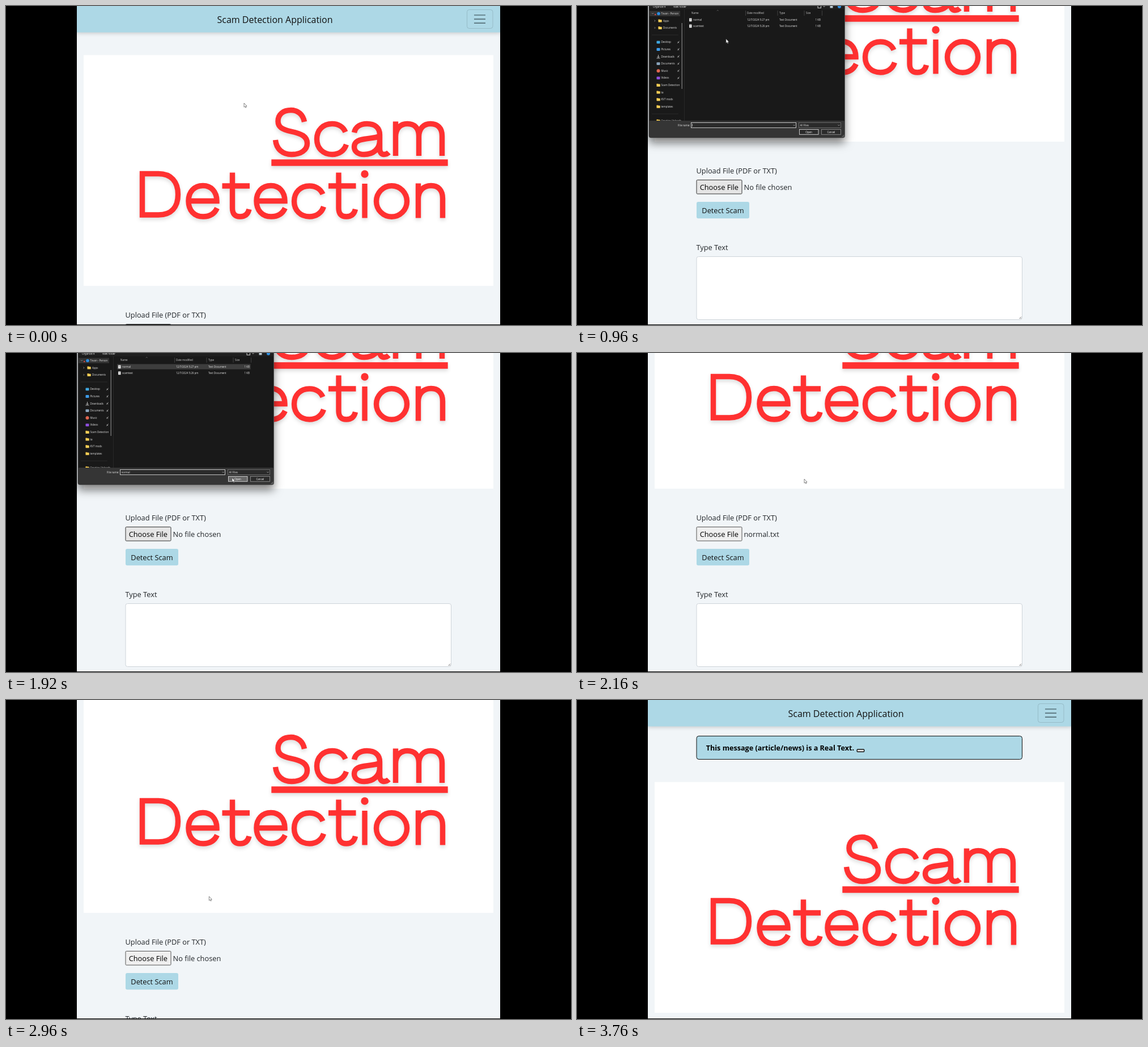
Recreate the animation shown at these times as an HTML page. Size 997 px wide and 562 px high, loop 3840 ms.

```html
<!DOCTYPE html>
<html lang="en">
<head>
<meta charset="utf-8">
<title>Scam Detection Application</title>
<style>
html, body { margin: 0; width: 100%; height: 100%; overflow: hidden; background: #000; }
svg { display: block; }
text { font-family: "Open Sans", "Noto Sans", sans-serif; white-space: pre; }
.lettering { fill: none; stroke: #ff3131; stroke-width: 9.4; filter: drop-shadow(0 4px 3px rgba(0, 0, 0, .13)); }
.nav { filter: drop-shadow(0 2px 3px rgba(0, 0, 0, .16)); }
.frame { filter: drop-shadow(0 9px 8px rgba(0, 0, 0, .5)); }
</style>
</head>
<body>
<svg id="stage" width="997" height="562" viewBox="0 0 997 562"></svg>
<script>
const LOOP = 3840, STEP = 80;
const INK = '#212529', SKY = '#add8e6';

const rect = (x, y, w, h, fill, more = '') =>
  `<rect x="${x}" y="${y}" width="${w}" height="${h}" fill="${fill}" ${more}/>`;
const text = (x, y, s, size = 12.8, fill = INK, more = '') =>
  `<text x="${x}" y="${y}" font-size="${size}" fill="${fill}" ${more}>${s}</text>`;
const line = (d, color, w = 1, more = '') =>
  `<path d="${d}" fill="none" stroke="${color}" stroke-width="${w}" ${more}/>`;
const dot = (x, y, r, fill) => `<circle cx="${x}" cy="${y}" r="${r}" fill="${fill}"/>`;
const group = (id, body, more = '') => `<g id="${id}" ${more}>${body}</g>`;

// Banner lettering, drawn as strokes along the middle of each letter
const glyphs = {
  S: 'M526.5 204C524 191 515 183.5 503 183.5C489 183.5 480 191 480 203C480 213 487 217.5 503 221C522 225 531.5 230 531.5 242C531.5 254 520 261.5 504 261.5C488 261.5 477 252 475.5 236',
  c: 'M599 222C595 212.5 586 207.5 575.5 207.5C559.5 207.5 548.5 218.5 548.5 234.5C548.5 250.5 559.5 261.5 575.5 261.5C587.5 261.5 597 255 600.5 244',
  a: 'M614.5 223C616.5 213 625 207.5 637 207.5C651 207.5 659.5 214.5 659.5 227V251C659.5 259 663 261.5 667 261.5C670.5 261.5 673 260.5 675.5 258M659.5 229C655 232 645 232.5 632 234.5C619 236.5 614.5 241 614.5 248C614.5 257 622 261.5 632 261.5C648 261.5 659.5 252 659.5 237',
  m: 'M687.5 203.5V264M687.5 230C687.5 216 696 207.5 708 207.5C721 207.5 728.5 215 728.5 229V264M728.5 230C728.5 216 737 207.5 749 207.5C762 207.5 769.5 215 769.5 229V264',
  D: 'M240.5 295.5H269C291 295.5 303.5 309 303.5 332C303.5 355 291 368 269 368H240.5Z',
  e: 'M322 343.5H372C372 327 362 316.5 347.5 316.5C332 316.5 322 327.5 322 343.5C322 360 332 371 348 371C359 371 368 366 372.5 356',
  t: 'M399.5 293.5V356C399.5 366 404 371 413 371C421 371 427 367 429 358M381.5 317H430',
  i: 'M633 313V373.5',
  o: 'M653.5 344a27 27.3 0 1 0 54 0a27 27.3 0 1 0 -54 0',
  n: 'M727.5 312.5V373.5M727.5 340C727.5 325 737 316.5 750 316.5C763 316.5 770.5 324.5 770.5 339V373.5'
};
const put = (ch, dx = 0, dy = 0) => `<path d="${glyphs[ch]}" transform="translate(${dx} ${dy})"/>`;
const lettering = `<g class="lettering" role="img" aria-label="Scam Detection">
  ${[...'Scam', ...'Detion'].map(ch => put(ch)).join('')}
  ${put('e', 120)}${put('c', -40, 109.5)}${put('t', 187.5)}
  <path d="M468.3 276H779.7" stroke-width="11.4"/>
  <circle cx="633" cy="296" r="6.7" fill="#ff3131" stroke="none"/></g>`;

const nav = `<g class="nav">${rect(125, -4, 747, 50.5, SKY)}</g>`
  + text(372.5, 29.7, 'Scam Detection Application', 16, '#111')
  + rect(813.5, 6.5, 45.5, 33, 'none', 'rx="4" stroke="#000" stroke-opacity=".13"')
  + line('M826 16H846M826 23.2H846M826 30.2H846', '#56707a', 1.7);

const alertBox = rect(211, 63.5, 574.5, 41, SKY, 'rx="4" stroke="#111"')
  + text(227.7, 89, 'This message (article/news) is a Real Text.', 12.6, '#000', 'font-weight="700"')
  + rect(494.2, 87, 12.5, 4.2, '#efefef', 'rx="1" stroke="#111" stroke-width="1.4"');

const main = rect(137, 86.5, 723, 406.5, '#fff') + lettering
  + text(210.5, 548.8, 'Upload File (PDF or TXT)')
  + rect(211, 560.5, 80, 24.5, '#efefef', 'id="choose" rx="1.5" stroke="#555"')
  + text(216.7, 578, 'Choose File', 12.8, '#000')
  + group('fileName', text(294.5, 578, 'No file chosen'))
  + rect(209.2, 597.2, 96.6, 32.6, '#8cc4f5', 'id="ring" rx="5"')
  + rect(211, 599, 93, 29.3, SKY, 'id="detect" rx="3"')
  + text(220.3, 618.5, 'Detect Scam', 12.8, '#111', 'id="detectText"')
  + text(210.5, 683.6, 'Type Text')
  + rect(211, 695.5, 574.5, 111, '#fff', 'rx="3.5" stroke="#ced4da"')
  + line('M780.5 805L784 801.5M782.8 805L784 803.8', '#555', .8);

// File picker
const tiny = (x, y, s, fill = '#e4e4e4', more = '') => text(x, y + 1.6, s, 4.5, fill, more);
const folder = (x, y) => rect(x, y - 2.5, 3, 2, '#d9a32b') + rect(x, y - 1.8, 6.2, 4.4, '#f6cf57', 'rx=".6"');
const chip = color => (x, y) => rect(x, y - 2.3, 6, 4.8, color, 'rx="1"');
const disc = color => (x, y) => dot(x + 3, y, 3, color);
const arrowDown = (x, y) => line(`M${x + 3} ${y - 3}V${y + 1.5}M${x + 1} ${y}L${x + 3} ${y + 2}L${x + 5} ${y}M${x} ${y + 3}H${x + 6}`, '#ddd', .8);
const places = [
  ['Desktop', chip('#3fa7e0')], ['Pictures', chip('#3d9be9')], ['Downloads', arrowDown],
  ['Documents', chip('#8ba5bd')], ['Music', disc('#e0654f')], ['Videos', chip('#8f4fe0')],
  ['Scam Detection', folder], ['ta', folder], ['KV7 mods', folder], ['templates', folder]
];
const pin = (x, y) => line(`M${x - 1.6} ${y + 1.8}L${x} ${y}M${x - 1.3} ${y - .9}L${x + .9} ${y + 1.3}M${x - .4} ${y}L${x + 1.6} ${y - 1.8}`, '#bbb', .9);
const sidebar = rect(128, 8.5, 54, 9.5, '#333')
  + line('M132 12.3L133.6 14L135.2 12.3M136.5 24.5L138 26L136.5 27.5M136.5 37L138 38.5L136.5 40', '#aaa', .7)
  + dot(144, 13.5, 2.8, '#2b8de0') + dot(138.2, 15, 1.2, '#e04848')
  + tiny(148.5, 13.3, 'Tovan - Person')
  + folder(143.5, 26) + tiny(152, 26, 'Apps') + folder(143.5, 38.5) + tiny(152, 38.5, 'Documents')
  + line('M132 51H179M132 190H179', '#333', .7)
  + places.map(([name, icon], i) => {
      const y = 63.8 + i * 12.6;
      return icon(140.5, y) + tiny(148.5, y, name) + (i < 6 ? pin(179, y) : '');
    }).join('')
  + folder(140.5, 202.3) + tiny(148.5, 202.3, 'Creative Uploads')
  + line('M185.2 30V146', '#9a9a9a', 1);

const cols = [['Name', 202], ['Date modified', 300], ['Type', 357], ['Size', 404]];
const fileRow = (y, name, date) =>
  rect(198, y - 2.8, 4.6, 5.8, '#e8e8e8', 'rx=".4"') + line(`M199 ${y - 1}H201.6M199 ${y + .5}H201.6`, '#777', .5)
  + tiny(205, y, name) + tiny(300, y, date) + tiny(357, y, 'Text Document')
  + tiny(430, y, '1 KB', '#e4e4e4', 'text-anchor="end"');

const picker = `<g class="frame">${rect(127, -20, 345.5, 252, '#191919', 'rx="3" stroke="#555" stroke-width=".8"')}</g>`
  + rect(127.4, -10, 344.7, 16, '#1f1f1f')
  + tiny(134, 1, 'Organize ▾') + tiny(170, 1, 'New folder')
  + rect(425, -3, 5.5, 6.5, 'none', 'stroke="#ccc"') + line('M434.5 0L436 1.6L437.5 0', '#ccc', .8)
  + rect(446.5, -3, 5, 6.5, '#b9c8d0') + dot(463, 1, 3, '#2f8fe0')
  + cols.map(([name, x]) => tiny(x, 12.3, name, '#d0d0d0')).join('')
  + line('M247 8.5L248.3 7.2L249.6 8.5', '#999', .6)
  + line('M189.5 6V202', '#2d2d2d', .8) + line('M297.5 8V17M354 8V17M401 8V17M432.5 8V17', '#4a4a4a', .8)
  + rect(196, 19.5, 235.5, 9.2, '#3d3d3d', 'id="picked"')
  + fileRow(24.2, 'normal', '12/7/2024 5:27 pm') + fileRow(35.3, 'scamtext', '12/7/2024 5:26 pm')
  + sidebar
  + rect(127.4, 202, 344.7, 29.6, '#353535', 'rx="2"')
  + tiny(199.5, 210, 'File name:', '#e4e4e4', 'text-anchor="end"')
  + rect(201.5, 205.5, 185, 9, '#2b2b2b', 'stroke="#d2d2d2" stroke-width=".9"')
  + group('typed', tiny(203.5, 210, 'normal')) + line('M203.5 207.5V212.5', '#eee', .7, 'id="caret"')
  + rect(391.5, 205.5, 74, 9, '#2b2b2b', 'stroke="#777" stroke-width=".8"') + tiny(393.5, 210, 'All Files')
  + line('M381.8 209.3L383.2 210.8L384.6 209.3M460.5 209.3L462 210.8L463.5 209.3', '#ccc', .7)
  + rect(392.5, 217.5, 33.5, 8.8, '#2b2b2b', 'id="open" stroke="#d8d8d8" stroke-width=".9"')
  + tiny(409, 222, 'Open', '#fff', 'text-anchor="middle"')
  + rect(431.5, 217.5, 34, 8.8, '#2b2b2b', 'stroke="#999" stroke-width=".8"')
  + tiny(448.5, 222, 'Cancel', '#fff', 'text-anchor="middle"')
  + line('M467.5 231L471.5 227M469.8 231L471.5 229.3', '#aaa', .7);

const pointer = group('arrow', '<path d="M0 0V7.2L1.7 5.8L2.8 8.2L4 7.6L3 5.3H5Z" fill="#fff" stroke="#555" stroke-width=".7"/>')
  + group('hand', '<path d="M-.8 0Q0 -1 .8 0V3L3.4 3.8V6.2L2.6 8.4H-1L-2.8 5.2L-2 4.6L-.8 5.6Z" fill="#fff" stroke="#333" stroke-width=".6"/>');

document.getElementById('stage').innerHTML =
  `<clipPath id="view"><rect x="125" y="0" width="747" height="561"/></clipPath>`
  + rect(0, 0, 997, 562, '#000')
  + `<g clip-path="url(#view)">${rect(125, 0, 747, 561, '#f1f5f8')}`
  + group('page', nav + group('alert', alertBox) + group('main', main))
  + group('picker', picker) + group('pointer', pointer) + '</g>';

// Tables: [time, ...values], straight lines between the rows
const scrollPath = [[0, 0], [80, 70], [160, 208], [240, 254], [2880, 254], [2960, 176], [3040, 58], [3120, 7.6], [3200, 0]];
const pointerPath = [
  [0, 420, 171], [240, 410.5, 194], [480, 330, 265], [640, 258, 318], [800, 257, 317], [960, 263, 58],
  [1200, 240, 40], [1360, 222, 24], [1520, 224, 24], [1840, 394, 214], [1920, 399, 220], [2160, 401, 222],
  [2480, 288, 350], [2640, 279, 361], [2880, 279, 361], [3120, 517, 316], [3360, 520, 318]
];
const at = (table, t) => {
  const i = table.findIndex(row => row[0] > t);
  if (i < 0) return table[table.length - 1].slice(1);
  const a = table[i - 1], b = table[i], k = (t - a[0]) / (b[0] - a[0]);
  return a.slice(1).map((v, n) => v + (b[n + 1] - v) * k);
};

const el = id => document.getElementById(id);
const set = (id, name, value) => el(id).setAttribute(name, value);
const show = (id, on) => { el(id).style.display = on ? '' : 'none'; };
const move = (id, x, y) => set(id, 'transform', `translate(${x} ${y})`);

function draw(t) {
  const between = (a, b) => t >= a && t < b;
  const done = t >= 2880, picked = t >= 1440;
  const [x, y] = at(pointerPath, t);
  const hover = between(2480, 2880), onButton = between(560, 2080);

  move('page', 0, -at(scrollPath, t)[0]);
  move('main', 0, done ? 58 : 0);
  move('pointer', x, y);
  show('alert', done);
  show('pointer', t < 3440);
  show('arrow', !hover);
  show('hand', hover);

  el('fileName').firstChild.textContent = between(2080, 2880) ? 'normal.txt' : 'No file chosen';
  set('choose', 'fill', onButton ? '#e5e5e5' : '#efefef');
  set('choose', 'stroke', onButton ? '#333' : '#555');
  show('ring', between(2640, 2880));
  set('detect', 'fill', hover ? '#4a7c97' : SKY);
  set('detectText', 'fill', hover ? '#fff' : '#111');

  show('picker', between(800, 2080));
  show('picked', picked);
  show('typed', picked);
  show('caret', !picked);
  set('open', 'fill', t >= 1840 ? '#686868' : '#2b2b2b');
}

const start = performance.now();
function tick() {
  const t = (performance.now() - start) % LOOP;
  draw(Math.floor(t / STEP) * STEP);
  requestAnimationFrame(tick);
}
tick();
</script>
</body>
</html>
```
